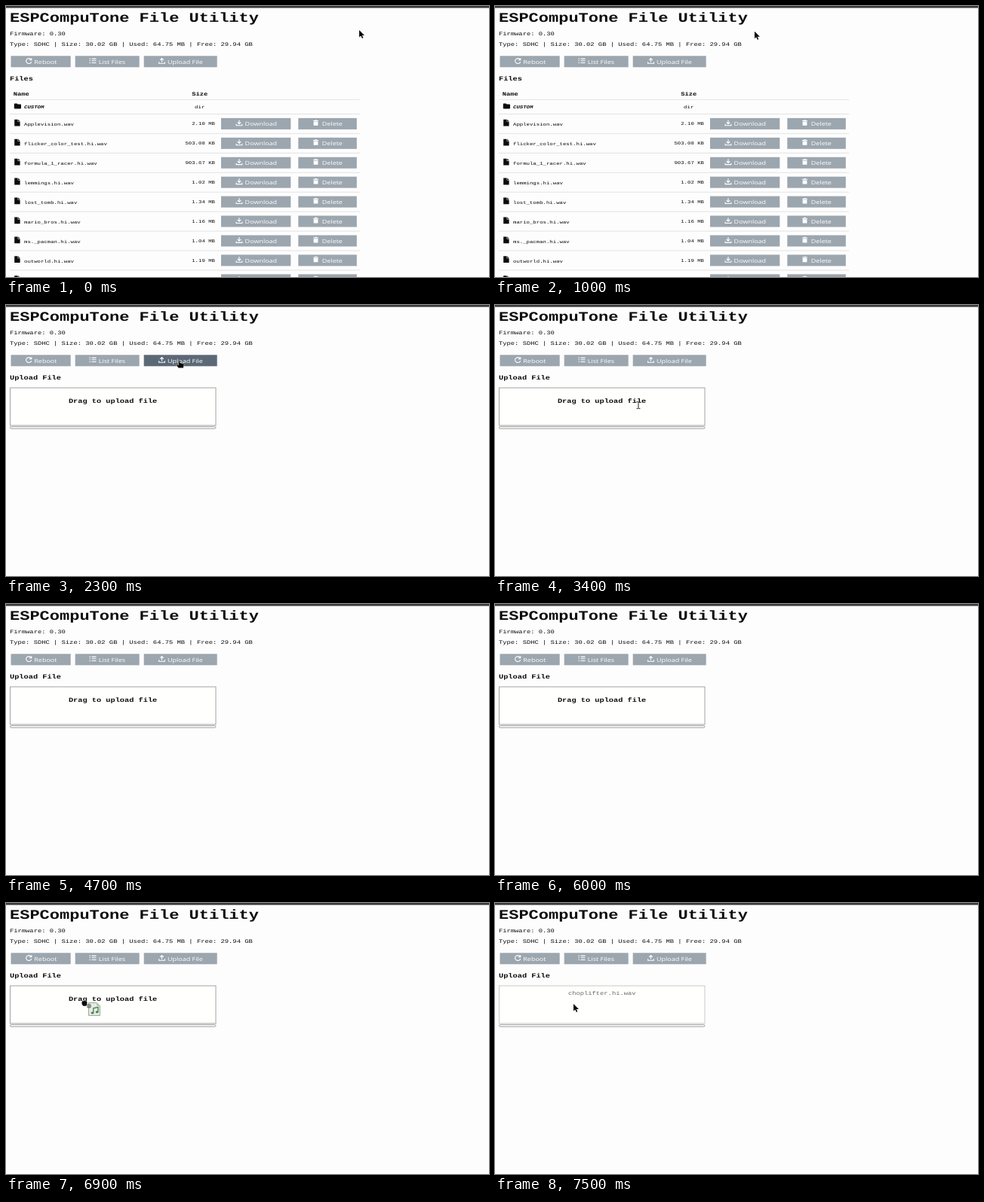
An HTML page that plays this animation: 640 px wide and 360 px high, repeating every 8000 ms.

```html
<!DOCTYPE html>
<html lang="en">
<head>
<meta charset="utf-8">
<title>File utility</title>
<style>
  html, body { margin: 0; width: 100%; height: 100%; overflow: hidden; background: #fdfdfd; }
  svg { display: block; width: 100vw; height: 100vh; }
  text { white-space: pre; text-rendering: geometricPrecision; }
  .mono { font-family: "Liberation Mono", "Courier New", monospace; fill: #0c0c0c; }
  .sans { font-family: "Open Sans", "Noto Sans", sans-serif; fill: #fff; }
  .bold { font-weight: 700; }
  .italic { font-style: italic; }
  .muted { fill: #666; }
  .button { fill: #9ca6af; }
  .button.hover { fill: #5b6977; }
  .rule { stroke: #e3e3e3; stroke-width: 1; }
  .icon { fill: none; stroke: #fff; stroke-width: 1.1; }
  .glyph { fill: #0c0c0c; }
  #box { fill: #fffffd; stroke: #a3a3a3; }
  #box.done { stroke: #c9c9c5; }
  #bar { fill: #fafafa; stroke: #9c9c9c; stroke-width: .9; }
  .pointer { fill: #0a0a0a; stroke: #fff; stroke-width: 1; paint-order: stroke; stroke-linejoin: round; }
</style>
</head>
<body>
<svg viewBox="0 0 640 360" preserveAspectRatio="none">
  <defs>
    <path id="reload" class="icon" d="M7.6 2.2A3.7 3.4 0 1 0 8.3 5.6M8.3 .6V3H5.6"/>
    <path id="list" class="icon" d="M0 1.5H1.5M3 1.5H9M0 4.2H1.5M3 4.2H9M0 6.9H1.5M3 6.9H9"/>
    <path id="upload" class="icon" d="M4.5 6V1M2.2 3.2L4.5 .9L6.8 3.2M.6 5.6V7.6H8.4V5.6"/>
    <path id="download" class="icon" d="M4.5 .3V5.2M2.2 3.1L4.5 5.4L6.8 3.1M.6 5.6V7.6H8.4V5.6"/>
    <path id="trash" fill="#fff" d="M0 .8H2.2V0H4.8V.8H7V1.8H0ZM.6 2.4H6.4V7.6H.6Z"/>
    <path id="folder" class="glyph" d="M0 1Q0 0 1 0H3.6L4.8 1.2H8.2Q9.2 1.2 9.2 2.2V6.2Q9.2 7.2 8.2 7.2H1Q0 7.2 0 6.2Z"/>
    <path id="file" class="glyph" d="M0 0H4.4V3H7.4V8.8H0ZM5 0L7.4 2.4H5Z"/>
  </defs>

  <rect width="640" height="360" fill="#fdfdfd"/>
  <rect width="640" height="2.6" fill="#3d3b39"/>
  <g id="head"></g>
  <g id="files"></g>
  <g id="upView">
    <rect id="box" x="5.5" y="110" width="272.5" height="50"/>
    <rect id="bar" x="5.5" y="161.7" width="272.5" height="2.6" rx="1.3"/>
  </g>

  <g id="cursor">
    <path id="arrow" class="pointer" d="M0 0V9.4L2.2 7.5L3.9 11L5.4 10.3L3.8 7H7Z"/>
    <path id="hand" class="pointer" d="M-.9 .6Q0 -.6 .9 .6V3.6L5.4 4.4Q6.4 4.8 6.2 6L5.4 10H-1L-3.6 6.6Q-3.4 5.4 -2.2 5.8L-.9 6.8Z"/>
    <path id="beam" fill="none" stroke="#222" stroke-width="1" d="M-2.4 -4.5Q0 -4.5 0 -3.6Q0 -4.5 2.4 -4.5M0 -3.6V3.8M-2.4 4.7Q0 4.7 0 3.8Q0 4.7 2.4 4.7"/>
    <g id="drag">
      <path d="M5.5 -1.5H16L20.5 2.5V15.5H5.5Z" fill="#e6e9e4" stroke="#8d938c" stroke-width=".8"/>
      <path d="M16 -1.5V2.5H20.5Z" fill="#b9c0b8"/>
      <path d="M11.8 11.8V5.8L18 4.4V10.4" fill="none" stroke="#3f8a45" stroke-width="1.3"/>
      <ellipse cx="10.5" cy="12" rx="1.9" ry="1.5" fill="#3f8a45"/>
      <ellipse cx="16.7" cy="10.7" rx="1.9" ry="1.5" fill="#3f8a45"/>
      <path class="pointer" d="M-3.4 -2.6Q-2.4 -4.6 -1.2 -3.6Q0 -5 1.2 -3.6Q2.6 -4.4 3.4 -2.6V.6L2.2 2.8H-1.8L-3.6 0Z"/>
      <path d="M4 1H8V4.8H4Z" fill="#fff" stroke="#222" stroke-width=".8"/>
      <path d="M6 1.9V3.9M5 2.9H7" stroke="#222" stroke-width=".7"/>
    </g>
  </g>
</svg>

<script>
const NS = "http://www.w3.org/2000/svg";
const ASPECT = 1.25;   // the whole page is shown wider than tall
const LOOP = 8000, TICK = 100;
const $ = id => document.getElementById(id);

function add(parent, tag, attrs, content = "") {
  const el = document.createElementNS(NS, tag);
  for (const k in attrs) el.setAttribute(k, attrs[k]);
  el.textContent = content;
  return parent.appendChild(el);
}

function label(parent, content, x, y, size, cls = "mono", anchor = "start") {
  return add(parent, "text", {
    class: cls, "font-size": size / ASPECT, "text-anchor": anchor,
    transform: `translate(${x} ${y}) scale(${ASPECT} 1)`
  }, content);
}

function icon(parent, name, x, y) {
  add(parent, "use", { href: "#" + name, x, y });
}

function button(parent, content, x, y, w, glyph, iconX, textX) {
  const rect = add(parent, "rect", { class: "button", x, y, width: w, height: 15 });
  icon(parent, glyph, iconX, y + 2.3);
  label(parent, content, textX, y + 10.4, 9, "sans");
  return rect;
}

function rule(parent, y) {
  add(parent, "line", { class: "rule", x1: 5, x2: 469, y1: y, y2: y });
}

const head = $("head"), files = $("files"), upView = $("upView");

label(head, "ESPCompuTone File Utility", 5, 21.2, 22, "mono bold");
label(head, "Firmware: 0.30", 5, 38.6, 8.8);
label(head, "Type: SDHC | Size: 30.02 GB | Used: 64.75 MB | Free: 29.94 GB", 5, 52.9, 8.8);
button(head, "Reboot", 6.5, 66.3, 79.2, "reload", 25.5, 37.3);
button(head, "List Files", 91.7, 66.3, 85, "list", 110.5, 122.8);
const upButton = button(head, "Upload File", 182.7, 66.3, 97, "upload", 202, 214);

label(files, "Files", 5, 99.4, 10.3, "mono bold");
label(files, "Name", 9.7, 118.6, 8.8, "mono bold");
label(files, "Size", 256.7, 118.6, 8.8, "mono bold", "middle");
rule(files, 124.3);
icon(files, "folder", 10.8, 129.4);
label(files, "CUSTOM", 24, 136.4, 7.33, "mono bold italic");
label(files, "dir", 256.7, 135.6, 7.33, "mono", "middle");
rule(files, 143.5);

[
  ["Applevision.wav", "2.10 MB"],
  ["flicker_color_test.hi.wav", "503.08 KB"],
  ["formula_1_racer.hi.wav", "903.67 KB"],
  ["lemmings.hi.wav", "1.02 MB"],
  ["lost_tomb.hi.wav", "1.34 MB"],
  ["mario_bros.hi.wav", "1.16 MB"],
  ["ms._pacman.hi.wav", "1.04 MB"],
  ["outworld.hi.wav", "1.19 MB"],
  ["", ""]
].forEach(([name, size], i) => {
  const y = 143.5 + i * 25.93;
  icon(files, "file", 11.2, y + 7.3);
  label(files, name, 24, y + 15.8, 7.33);
  label(files, size, 277, y + 14.7, 7.33, "mono", "end");
  button(files, "Download", 285, y + 5.4, 92.3, "download", 304.5, 316.6);
  button(files, "Delete", 387.3, y + 5.4, 77.5, "trash", 407, 418.8);
  rule(files, y + 25.93);
});

label(upView, "Upload File", 5, 99.4, 10.3, "mono bold");
const prompt = label(upView, "Drag to upload file", 141.6, 130.2, 10.3, "mono bold", "middle");
const dropped = label(upView, "choplifter.hi.wav", 141.7, 121.6, 8.8, "mono muted", "middle");

const linear = p => p;
const inOut = p => p * p * (3 - 2 * p);
const out = p => 1 - (1 - p) ** 2;

// start, end, from, control point, to, easing
const moves = [
  [500, 1400, [468, 32], [375, 12], [236, 66], inOut],
  [1400, 1600, [236, 66], [232, 70], [229.5, 73.5], out],
  [2800, 3400, [229.5, 73.5], [215, 110], [190, 133], inOut],
  [3400, 3800, [190, 133], [160, 130], [146, 129], out],
  [3800, 4600, [146, 129], [300, 126], [536, 142], inOut],
  [6400, 6600, [572, 99], [390, 102], [186, 110], linear],
  [6600, 6900, [186, 110], [140, 124], [104, 134], out]
];

function position(t) {
  let move = moves[0];
  for (const m of moves) if (t >= m[0]) move = m;
  const [start, end, a, c, b, ease] = move;
  const p = ease(Math.min(1, Math.max(0, (t - start) / (end - start))));
  return [0, 1].map(i => (1 - p) ** 2 * a[i] + 2 * p * (1 - p) * c[i] + p * p * b[i]);
}

function pointer(t, x, y) {
  if (t >= 4700 && t < 6400) return "";
  if (t >= 6400 && t < 7500) return "drag";
  if (t >= 1500 && t < 3000) return "hand";
  const overPrompt = t >= 3000 && t < 4700 && x > 83 && x < 201 && y > 119 && y < 135;
  return overPrompt ? "beam" : "arrow";
}

const show = (el, on) => el.style.display = on ? "" : "none";

function draw(now) {
  const t = Math.floor((now % LOOP) / TICK) * TICK;
  show(files, t < 2300);
  show(upView, t >= 2300);
  show(prompt, t < 7500);
  show(dropped, t >= 7500);
  $("box").classList.toggle("done", t >= 7500);
  upButton.classList.toggle("hover", t >= 1500 && t < 3000);

  const [x, y] = position(t);
  const shape = pointer(t, x, y);
  for (const id of ["arrow", "hand", "beam", "drag"]) show($(id), id === shape);
  $("cursor").setAttribute("transform", `translate(${x} ${y})`);
}

const begin = performance.now();
function frame() {
  draw(performance.now() - begin);
  requestAnimationFrame(frame);
}
frame();
</script>
</body>
</html>
```
